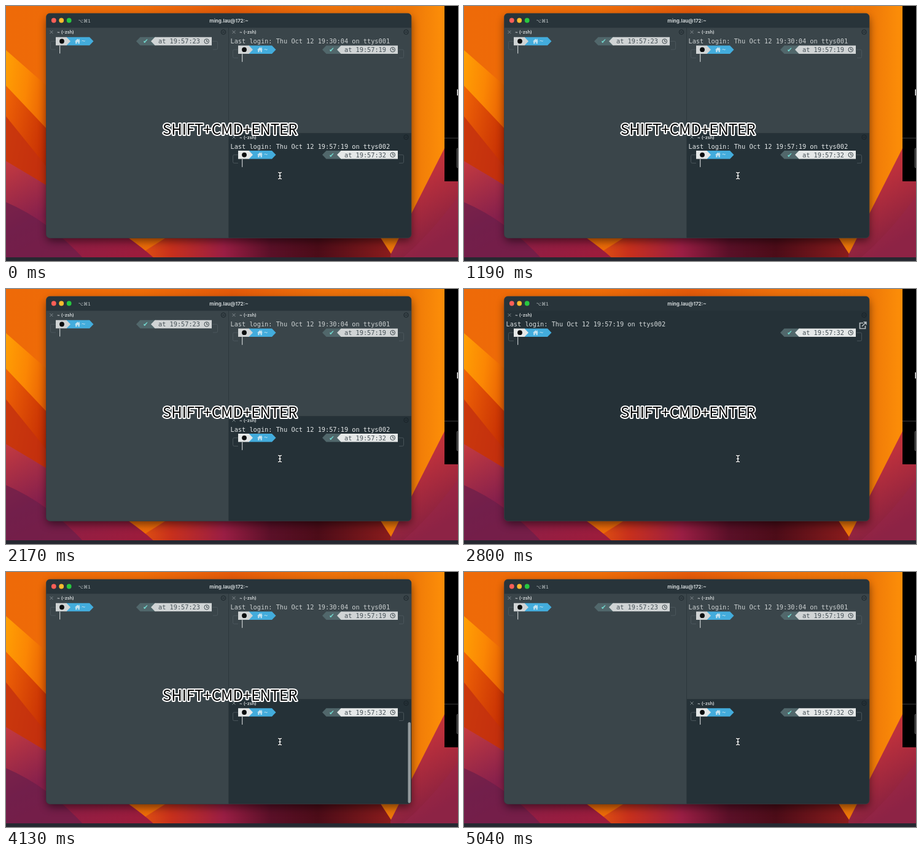
An HTML page for the animation above (5110 ms loop, 736 by 416 pixels).

```html
<!DOCTYPE html>
<html lang="en">
<head>
<meta charset="utf-8">
<style>
html, body { margin: 0; width: 100%; height: 100%; overflow: hidden; background: #000; }
svg { display: block; width: 736px; height: 416px; }
text { white-space: pre; }
.mono { font: 10.28px "DejaVu Sans Mono", monospace; }
.ui { font: 600 7.2px Inter, sans-serif; }
.sym { font-family: "DejaVu Sans", sans-serif; }
.label { font: 500 24px "Noto Sans CJK SC", "Noto Sans CJK JP", "Noto Sans CJK", "Noto Sans", sans-serif;
  text-anchor: middle; fill: #000; stroke: #fff; stroke-width: 4; stroke-linejoin: round; paint-order: stroke; }
</style>
</head>
<body>
<svg id="stage" viewBox="0 0 736 416">
  <defs>
    <linearGradient id="sky">
      <stop offset="0" stop-color="#ee6a08"/><stop offset=".3" stop-color="#ee6c08"/>
      <stop offset=".5" stop-color="#e45a0a"/><stop offset=".7" stop-color="#ec700a"/>
      <stop offset=".9" stop-color="#ee7808"/><stop offset=".96" stop-color="#fb8c08"/>
    </linearGradient>
    <linearGradient id="glow" x2="1" y2=".5">
      <stop offset="0" stop-color="#ffa004"/><stop offset=".5" stop-color="#fb8604"/><stop offset="1" stop-color="#e65c04"/>
    </linearGradient>
    <linearGradient id="ember" x2="1" y2=".6">
      <stop offset="0" stop-color="#f06406"/><stop offset="1" stop-color="#c42c04"/>
    </linearGradient>
    <linearGradient id="plum" x2=".8" y2="1">
      <stop offset="0" stop-color="#c43a40"/><stop offset=".45" stop-color="#86204c"/><stop offset="1" stop-color="#9c1c3c"/>
    </linearGradient>
    <linearGradient id="floor">
      <stop offset="0" stop-color="#e8600c"/><stop offset=".16" stop-color="#c8301c"/>
      <stop offset=".36" stop-color="#9a1e44"/><stop offset=".54" stop-color="#5a1028"/>
      <stop offset=".72" stop-color="#4c0c18"/><stop offset="1" stop-color="#8a1c1c"/>
    </linearGradient>
    <linearGradient id="fan" x2=".3" y2="1">
      <stop offset="0" stop-color="#d4452c"/><stop offset=".5" stop-color="#bc303c"/><stop offset="1" stop-color="#842040"/>
    </linearGradient>
    <clipPath id="frame"><rect x="65.5" y="12" width="594.5" height="366.500" rx="6"/></clipPath>
    <filter id="soft" x="-10%" y="-10%" width="120%" height="125%"><feGaussianBlur stdDeviation="7"/></filter>
  </defs>

  <!-- wallpaper -->
  <rect width="736" height="416" fill="url(#sky)"/>
  <path d="M0 72L66 130V320H0Z" fill="url(#glow)"/>
  <path d="M0 130L66 200V320H0Z" fill="url(#ember)"/>
  <path d="M0 180L66 262V320H0Z" fill="#c43010" opacity=".8"/>
  <path d="M200 416L270 372H606L628 406V416Z" fill="url(#floor)"/>
  <path d="M0 253Q80 300 150 345T246 416H0Z" fill="url(#plum)"/>
  <path d="M0 320Q70 350 130 416H0Z" fill="#6a1e4a" opacity=".7"/>
  <path d="M626 416V406L714 232L736 190V416Z" fill="url(#fan)"/>
  <path d="M640 416Q694 370 736 310V416Z" fill="#98264a" opacity=".5"/>
  <rect y="410" width="736" height="6" fill="#262831"/>

  <!-- neighbouring window -->
  <rect x="714" width="22" height="286" fill="#000"/>
  <path d="M714 215.5H736" stroke="#3a3a3a"/>
  <rect x="734.5" y="136" width="2" height="10" fill="#eee"/>
  <rect x="734" y="232" width="4" height="32" rx="2" fill="#333" stroke="#777" stroke-width=".6"/>

  <!-- terminal -->
  <rect x="66" y="18" width="594" height="366" rx="8" opacity=".5" filter="url(#soft)"/>
  <g clip-path="url(#frame)">
    <rect x="65" y="12" width="595" height="367" fill="#253137"/>
    <g id="split"></g>
    <g id="zoomed"></g>
    <rect x="65" y="12" width="595" height="23.5" fill="#28343a"/>
    <circle cx="77.8" cy="23.5" r="3.9" fill="#fe5f57"/>
    <circle cx="90.2" cy="23.5" r="3.9" fill="#febb2e"/>
    <circle cx="102.7" cy="23.5" r="3.9" fill="#28c840"/>
    <text class="sym" x="117.5" y="26.5" font-size="7.3" fill="#c2c9cb">⌥⌘1</text>
    <text class="ui" x="363" y="26.6" text-anchor="middle" style="font-size:8px;font-weight:700" fill="#ced4d6">ming.lau@172:~</text>
    <rect id="bar" x="654.5" y="245" width="4.5" height="132" rx="2.2" fill="#929a9d"/>
  </g>
  <rect x="65.5" y="12" width="594.5" height="366.500" rx="6" fill="none" stroke="#3c4143" stroke-width=".6"/>

  <g id="beam" fill="none"></g>
  <text class="label" id="label" x="364.7" y="210">SHIFT+CMD+ENTER</text>
</svg>
<script>
const LOOP = 5110, ZOOM_IN = 2590, ZOOM_OUT = 4130, LABEL_END = 5040;
const $ = id => document.getElementById(id);

// Pane header: close mark, name and menu circle
const tab = (x, y, right) => `
  <path d="M${x + 5.5} ${y - 2.5}l5 5m0 -5l-5 5" stroke="#919a9d" stroke-width=".8"/>
  <text class="ui" x="${x + 17}" y="${y + 2.6}" fill="#dde1e2">~ (-zsh)</text>
  <g fill="none" stroke="#172126" stroke-width=".9"><circle cx="${right}" cy="${y}" r="3.7"/>
  <path d="M${right - 2} ${y}h4"/></g>`;

const login = (x, y, time, tty, color) =>
  `<text class="mono" x="${x}" y="${y}" fill="${color}">Last login: Thu Oct 12 ${time} on ttys00${tty}</text>`;

// Two-line shell prompt; x is the pane's left edge, r the left tip of the right-hand part
const prompt = (x, r, y, time, active) => {
  const pale = active ? "#e5e8e8" : "#d0d4d5";
  return `
  <g transform="translate(${x} ${y})">
    <path d="M15 0H8.5Q6.5 0 6.5 2V11.5Q6.5 13.5 8.5 13.5H15" fill="none" stroke="#4d595e" stroke-width=".9"/>
    <path d="M32 -6.7H70L76.5 0L70 6.7H32Z" fill="#43acdc"/>
    <path d="M15 -6.7H32.5L39 0L32.5 6.7H15Z" fill="${pale}"/>
    <circle cx="25" cy="0" r="3.9" fill="#0b0d0e"/>
    <path d="M46 .3L50.5 -4L52.5 -2V-3.8H53.8V-.9L55 .3H53.8V4H51.5V1.3H49.5V4H47.2V.3Z" fill="#c4e2ef"/>
    <text class="mono" x="57" y="3.6" fill="#c4e2ef">~</text>
    <path d="M21.7 7V20" stroke="#e4e8e9" stroke-width="1"/>
  </g>
  <g transform="translate(${r} ${y})">
    <path d="M0 0L6.5 -6.7H33V6.7H6.5Z" fill="#51676b"/>
    <path d="M24 0L30.5 -6.7H123V6.7H30.5Z" fill="${pale}"/>
    <text class="sym" x="11" y="3.7" font-size="10.5" fill="#72d8cf">✔</text>
    <text class="mono" x="36" y="3.7" fill="#465157">at ${time}</text>
    <g fill="none" stroke="#3b464b"><circle cx="114.7" cy="0" r="3.8"/><path d="M114.7 -2.5V.4H117"/></g>
    <path d="M124 0H130.5Q132.5 0 132.5 2V11.5Q132.5 13.5 130.5 13.5H125" fill="none" stroke="#4d595e" stroke-width=".9"/>
  </g>`;
};

$("split").innerHTML = `
  <rect x="65" y="35" width="298" height="344" fill="#3a454a"/>
  <rect x="363" y="35" width="297" height="172.5" fill="#3a454a"/>
  <path d="M362.5 35V378M362.5 207.5H660" stroke="#2a353a" stroke-width=".8"/>
  ${tab(66, 42.5, 354)}${prompt(66, 212, 57.5, "19:57:23")}
  ${tab(363, 42.5, 651.5)}${login(365.5, 61, "19:30:04", 1, "#cbd0d1")}${prompt(363, 515, 71.2, "19:57:19")}
  ${tab(363, 214, 651.5)}
  <g id="before">${login(365.5, 232.8, "19:57:19", 2, "#e3e7e8")}${prompt(363, 515, 242.8, "19:57:32", true)}</g>
  <g id="after">${prompt(363, 515, 229, "19:57:32", true)}</g>`;

$("zoomed").innerHTML = `
  ${tab(66, 42.5, 651.5)}${login(68.5, 61, "19:57:19", 2, "#d7dcdd")}${prompt(66, 515, 71.2, "19:57:32", true)}
  <path d="M650 55.5H644.5V64.5H653.5V60M648 61L654 55" fill="none" stroke="#b4bcbf" stroke-width="1.7"/>
  <path d="M650 53.3H655.7V59Z" fill="#b4bcbf"/>`;

// Text pointer: dark rim, then light line
const beam = (color, width) => `<path stroke="${color}" stroke-width="${width}"
  d="M443 271.5Q446 271.5 446 273V280.5Q446 282 443 282M449 271.5Q446 271.5 446 273M446 280.5Q446 282 449 282M444 277H448"/>`;
$("beam").innerHTML = beam("#101518", 3) + beam("#e8ebec", 1.5);

const show = (id, on) => $(id).style.display = on ? "" : "none";

function draw(now) {
  const t = now % LOOP;
  const zoomed = t >= ZOOM_IN && t < ZOOM_OUT, after = t >= ZOOM_OUT;
  show("split", !zoomed);
  show("zoomed", zoomed);
  show("before", !after);
  show("after", after);
  show("label", t < LABEL_END);
  // The scroll bar fades shortly after the panes return
  $("bar").style.opacity = after ? Math.max(0, Math.min(1, (4830 - t) / 280)) : 0;
}

const start = performance.now();
function tick() {
  draw(performance.now() - start);
  requestAnimationFrame(tick);
}
tick();
</script>
</body>
</html>
```
